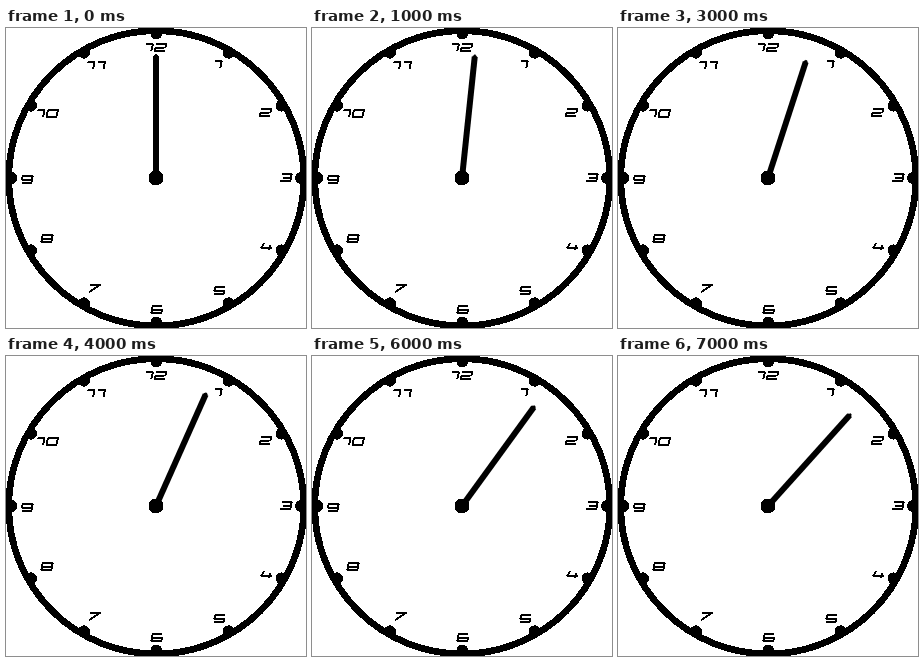
Recreate the animation shown at these times as an HTML page. Size 300x300 px, loop 8 s.

```html
<!DOCTYPE html>
<html lang="en">
<head>
<meta charset="utf-8">
<title>Clock</title>
<style>
  html, body { margin: 0; width: 100%; height: 100%; overflow: hidden; background: #fff; }
  svg { display: block; width: 100vw; height: 100vh; shape-rendering: crispEdges; }
  .ring { fill: none; stroke: #000; stroke-width: 6.7; }
  .hand {
    stroke: #000; stroke-width: 5.4; stroke-linecap: round;
    transform-origin: 150px 150px;
    animation: tick 8s steps(8, end) infinite;
  }
  .numeral { fill: none; stroke: #000; stroke-width: 2; stroke-linejoin: round; }
  @keyframes tick { from { transform: rotate(0deg); } to { transform: rotate(48deg); } }
</style>
</head>
<body>
<svg viewBox="0 0 300 300">
  <circle class="ring" cx="150.3" cy="150.3" r="147.6"/>
  <g id="dots"></g>
  <g id="numerals"></g>
  <line class="hand" x1="150" y1="150" x2="150" y2="29"/>
  <circle cx="150" cy="150" r="7.5"/>
</svg>
<script>
  // Wide square digits on a 10 x 7 grid; the slant is added by skewX.
  const digits = [
    'M1 0H9Q10 0 10 1V6Q10 7 9 7H1Q0 7 0 6V1Q0 0 1 0Z',
    'M0 0H6Q7 0 7 1V7',
    'M0 0H9Q10 0 10 1V2.5Q10 3.5 9 3.5H1Q0 3.5 0 4.5V7H10',
    'M0 0H9Q10 0 10 1V6Q10 7 9 7H0M2 3.5H10',
    'M2 0L0 4.5H11M8.5 2V7',
    'M10 0H0V3.5H9Q10 3.5 10 4.5V6Q10 7 9 7H0',
    'M9 0H1Q0 0 0 1V6Q0 7 1 7H9Q10 7 10 6V3.5H0',
    'M0 0H10L1 7',
    'M1 0H9Q10 0 10 1V6Q10 7 9 7H1Q0 7 0 6V1Q0 0 1 0ZM0 3.5H10',
    'M10 3.5H0V1Q0 0 1 0H9Q10 0 10 1V6Q10 7 9 7H1'
  ];
  const centres = [
    [211.5, 36.5], [259.5, 84.5], [280, 149.5], [260.5, 218.5], [213.5, 262.5], [151, 281.5],
    [88, 260.5], [41, 210.5], [21, 151.5], [41, 85.5], [89.5, 37.5], [149.3, 19.5]
  ];
  const gap = 3.5;
  const digitWidth = d => d === '1' ? 7 : 10;

  function add(parent, tag, attrs) {
    const el = document.createElementNS('http://www.w3.org/2000/svg', tag);
    for (const key in attrs) el.setAttribute(key, attrs[key]);
    return parent.appendChild(el);
  }

  function addNumeral(hour, [x, y]) {
    const chars = [...String(hour)];
    const width = chars.reduce((sum, d) => sum + digitWidth(d) + gap, -gap);
    const group = add(numerals, 'g', {
      class: 'numeral', role: 'img', 'aria-label': hour,
      transform: `translate(${x} ${y}) skewX(-13) translate(${-width / 2} -3.5)`
    });
    let left = 0;
    for (const d of chars) {
      add(group, 'path', { d: digits[d], transform: `translate(${left} 0)` });
      left += digitWidth(d) + gap;
    }
  }

  const dots = document.getElementById('dots');
  const numerals = document.getElementById('numerals');
  centres.forEach((centre, i) => {
    const angle = (i + 1) * Math.PI / 6;
    add(dots, 'circle', {
      cx: 150.3 + 144.7 * Math.sin(angle),
      cy: 150 - 144.7 * Math.cos(angle),
      r: 6
    });
    addNumeral(i + 1, centre);
  });
</script>
</body>
</html>
```
